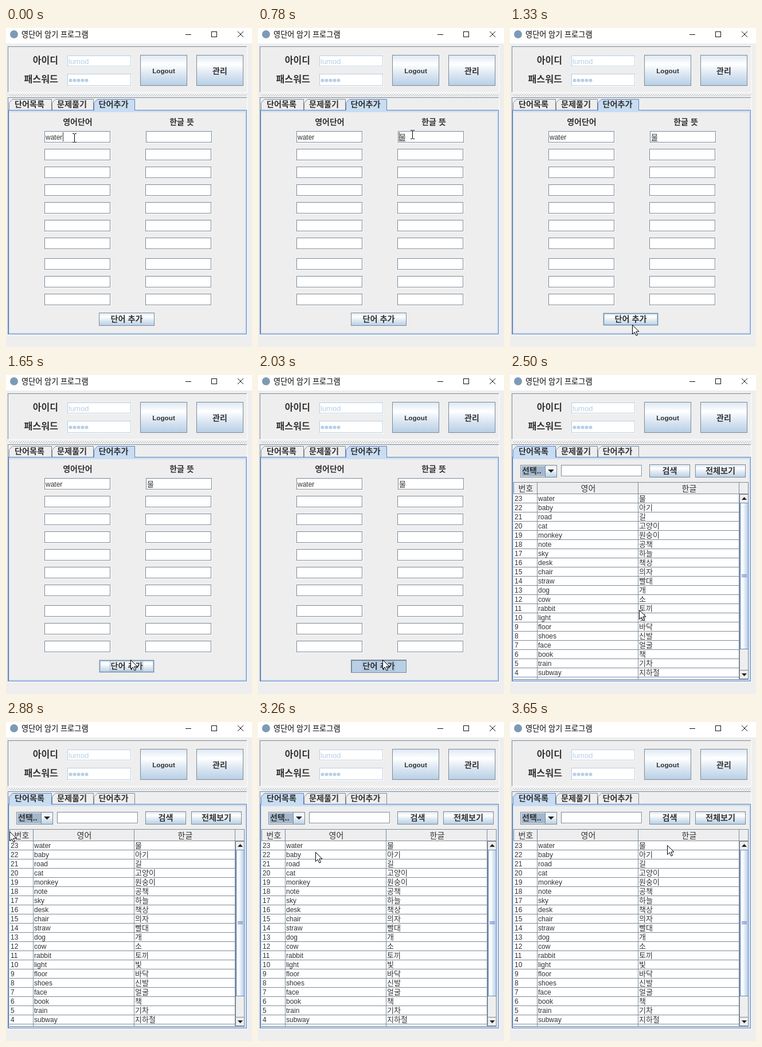
Recreate the animation shown at these times as an HTML page. Size 429 by 557 pixels, loop 3.72 s.

```html
<!DOCTYPE html>
<html lang="ko">
<head>
<meta charset="utf-8">
<title>영단어 암기 프로그램</title>
<style>
html, body { margin: 0; width: 100%; height: 100%; overflow: hidden; background: #eee; }
svg { display: block; width: 429px; height: 557px; }
text { font-family: "Liberation Sans", "Noto Sans CJK KR", "Noto Sans CJK", sans-serif; fill: #333; white-space: pre; }
rect, line, .crisp { shape-rendering: crispEdges; }
.bold { font-weight: bold; }
</style>
</head>
<body>
<svg id="stage" viewBox="0 0 429 557"></svg>
<script>
const LOOP = 3720;
const STEEL = '#7a8a99', SKY = '#b8cfe5', PALE = '#c8ddf2', BLUE = '#6382bf';

const words = `water 물,baby 아기,road 길,cat 고양이,monkey 원숭이,note 공책,sky 하늘,desk 책상,
chair 의자,straw 빨대,dog 개,cow 소,rabbit 토끼,light 빛,floor 바닥,shoes 신발,face 얼굴,book 책,
train 기차,subway 지하철`.split(',').map(pair => pair.trim().split(' '));

// Shapes; box and line coordinates name the pixels they cover.
const fill = (x, y, w, h, color) => `<rect x="${x}" y="${y}" width="${w}" height="${h}" fill="${color}"/>`;
const box = (x, y, w, h, color = '#fff', edge = STEEL) =>
  `<rect x="${x + .5}" y="${y + .5}" width="${w}" height="${h}" fill="${color}" stroke="${edge}"/>`;
const hLine = (x1, x2, y, color = STEEL) => fill(x1, y, x2 - x1, 1, color);
const vLine = (x, y1, y2, color = STEEL) => fill(x, y1, 1, y2 - y1, color);
const group = (id, content) => `<g id="${id}">${content}</g>`;
const text = (x, y, string, size = 12, extra = '') =>
  `<text x="${x}" y="${y}" font-size="${size}" ${extra}>${string}</text>`;
const centered = (x, y, string, size) => text(x, y, string, size, 'text-anchor="middle"');
const bold = (x, y, string, size = 14.2, anchor = 'middle') =>
  text(x, y, string, size, `class="bold" text-anchor="${anchor}"`);
const repeat = (n, draw) => Array.from({ length: n }, (_, i) => draw(i)).join('');

// Sunken frame: dark above and left, light below and right.
const sunken = (x, y, w, h) =>
  hLine(x, x + w, y + h, '#fff') + vLine(x + w, y, y + h + 1, '#fff') + hLine(x, x + w, y) + vLine(x, y, y + h);
const field = (x, y, w = 114, h = 19, edge = STEEL) =>
  hLine(x + 1, x + w + 2, y + h + 1, '#fff') + vLine(x + w + 1, y + 1, y + h + 2, '#fff') + box(x, y, w, h, '#fff', edge);
const button = (x, y, w, h, label, baseline, size) =>
  box(x, y, w - 1, h - 1, 'url(#metal)') + bold(x + w / 2, baseline, label, size);

const tabs = [[5, 80, '단어목록'], [80, 153, '문제풀기'], [153, 225, '단어추가']];
function tab([left, right, label], selected) {
  const edge = selected ? BLUE : STEEL;
  return `<path d="M${left + .5} 144V130.5L${left + 6.5} 124.5H${right - .5}V144" fill="${selected ? PALE : '#eee'}" stroke="${edge}"/>`
    + bold((left + right) / 2 - 1.5, 137.5, label);
}
const tabPane = active => tabs.map((t, i) => tab(t, i === active)).join('')
  + box(4, 143, 415, 391, PALE, BLUE) + fill(6, 147, 411, 385, '#eee')
  + fill(tabs[active][0] + 1, 143, tabs[active][1] - tabs[active][0] - 2, 1, PALE);

const gradient = (id, x2, y2) => `<linearGradient id="${id}" x2="${x2}" y2="${y2}">
  <stop stop-color="#dde8f3"/><stop offset=".3" stop-color="#fff"/>
  <stop offset=".6" stop-color="#dde8f3"/><stop offset="1" stop-color="${SKY}"/></linearGradient>`;

const defs = `<defs>${gradient('metal', 0, 1)}${gradient('side', 1, 0)}
  <pattern id="bumps" x="5" y="115" width="4" height="4" patternUnits="userSpaceOnUse">
  ${fill(0, 0, 1, 1, '#fff') + fill(1, 1, 1, 1, STEEL) + fill(2, 2, 1, 1, '#fff') + fill(3, 3, 1, 1, STEEL)}</pattern></defs>`;

const titleBar = fill(0, 0, 429, 27, '#fff')
  + '<circle cx="14" cy="11" r="7" fill="#7d9ab5"/>'
  + text(27, 15.5, '영단어 암기 프로그램', 13.2, 'style="fill:#000"')
  + hLine(313, 323, 11, '#111') + box(358, 6, 9, 9, 'none', '#111')
  + '<path d="M404 6l10 10m0-10l-10 10" stroke="#111" fill="none"/>';

const loginPanel = sunken(3, 32, 417, 80)
  + bold(91, 62, '아이디', 16, 'end') + bold(91, 95, '패스워드', 16.2, 'end')
  + field(107, 48, 110, 18, SKY) + field(107, 80, 110, 20, SKY)
  + text(109, 63, 'lumod', 13, `style="fill:${SKY}"`)
  + repeat(5, i => `<circle cx="${112.5 + 7 * i}" cy="91.5" r="3" fill="${SKY}"/>`)
  + button(234, 47, 82, 54, 'Logout', 79, 11.7) + button(332, 47, 82, 54, '관리', 79.5, 14)
  + fill(5, 115, 414, 5, 'url(#bumps)')
  + sunken(3, 121, 417, 414);

const fieldTop = i => 180 + 31 * i + (i > 6 ? 5 : 0);
const formPage = tabPane(2) + bold(125, 169, '영어단어', 14) + bold(306.5, 169, '한글 뜻', 14)
  + repeat(10, i => field(67, fieldTop(i)) + field(i ? 243 : 244, fieldTop(i)))
  + text(69, 195, 'water')
  + group('leftCaret', vLine(99, 182, 198, '#333'))
  + group('rightCaret', vLine(246, 182, 198, '#333'))
  + '<text id="meaning" x="246" y="195" font-size="13"></text>'
  + '<path id="composing" class="crisp" d="M246 197.5h12" stroke="#333" stroke-dasharray="1 1"/>'
  + button(162, 497, 97, 23, '')
  + group('hover', box(162, 497, 96, 22, 'none', SKY) + box(163, 498, 94, 20, 'none') + box(164, 499, 92, 18, 'none', SKY))
  + group('pressed', box(162, 497, 96, 22, SKY) + hLine(162, 259, 498) + vLine(163, 498, 520))
  + group('focus', box(181, 499, 57, 17, 'none', '#a3b8cc'))
  + bold(210.5, 513, '단어 추가', 14.2);

const rowLines = repeat(20, i => hLine(6, 400, 223 + 16 * i));
const rows = words.map(([english, korean], i) => {
  const y = 220 + 16 * i;
  return text(8, y, 23 - i) + text(49, y, english) + text(225, y, korean, 13);
}).join('');

const arrowButton = (y, points) => box(400, y, 15, 15, '#eee') + `<path d="${points}" fill="#222"/>`;
const scrollBar = box(400, 208, 15, 322, '#eee')
  + arrowButton(208, 'M404 218h9l-4.5-5z') + arrowButton(515, 'M404 521h9l-4.5 5z')
  + box(401, 223, 14, 255, 'url(#side)', BLUE)
  + repeat(3, i => hLine(404, 413, 348 + 2 * i, BLUE));

const listPage = tabPane(0)
  + box(18, 157, 63, 21, '#eee') + fill(20, 159, 41, 18, '#a3b8cc') + bold(21, 172, '선택..', 14, 'start')
  + box(61, 157, 20, 21, 'url(#metal)') + '<path d="M66 165h11l-5.5 5.5z" fill="#222"/>'
  + field(89, 157, 140, 19)
  + button(243, 156, 71, 23, '검색', 172) + button(323, 156, 88, 23, '전체보기', 172)
  + box(6, 187, 409, 344, '#eee') + fill(6, 208, 394, 323, '#fff')
  + hLine(6, 416, 207) + rowLines
  + [47, 223, 399].map(x => vLine(x, 188, 531)).join('')
  + centered(27.5, 203, '번호', 14) + centered(136.5, 203, '영어', 14) + centered(312.5, 203, '한글', 14)
  + rows + scrollBar;

const pointers = `<path id="arrow" d="M.5 .5V16.5L4.2 13L7 19L9.5 18L6.8 12H12z" fill="#fff" stroke="#000"/>
  <path id="beam" class="crisp" d="M-3 -7.5h3m1 0h3M.5 -7V7M-3 7.5h3m1 0h3" fill="none" stroke="#000"/>`;

const stage = document.getElementById('stage');
stage.innerHTML = defs + titleBar + loginPanel
  + group('formPage', formPage) + group('listPage', listPage) + pointers;

// Pointer stops: start time, x, y.
const stops = [
  [0, 119, 192], [380, 165, 207], [460, 230, 206], [550, 280, 194], [630, 269, 186],
  [1100, 261, 218], [1180, 245, 330], [1250, 226, 455], [1330, 213, 518],
  [1500, 214, 510], [1580, 216, 501], [1650, 217, 497],
  [2260, 218, 480], [2340, 220, 455], [2420, 223, 430], [2490, 225, 410], [2570, 226, 399],
  [2720, 150, 310], [2800, 60, 232], [2880, 6, 191], [2960, 10, 205], [3040, 21, 216],
  [3110, 41, 223], [3190, 66, 227], [3260, 100, 227], [3340, 145, 226], [3420, 190, 223],
  [3490, 230, 220], [3570, 260, 217], [3650, 274, 215]
];

const part = id => document.getElementById(id);
const show = (id, visible) => part(id).setAttribute('visibility', visible ? 'inherit' : 'hidden');

function draw() {
  const t = performance.now() % LOOP;
  const during = (from, to) => t >= from && t < to;
  const [, x, y] = stops.findLast(stop => stop[0] <= t);
  const overField = t < 380 || during(550, 1100);

  show('formPage', t < 2120);
  show('listPage', t >= 2120);
  show('leftCaret', t < 380);
  show('rightCaret', during(550, 1100));
  part('meaning').textContent = t < 630 ? '' : t < 780 ? '무' : '물';
  show('composing', during(630, 1650));
  show('hover', during(1330, 2030));
  show('focus', during(1650, 2120));
  show('pressed', during(2030, 2120));

  show('arrow', !overField);
  show('beam', overField);
  part(overField ? 'beam' : 'arrow').setAttribute('transform', `translate(${x} ${y})`);
  requestAnimationFrame(draw);
}
draw();
</script>
</body>
</html>
```
